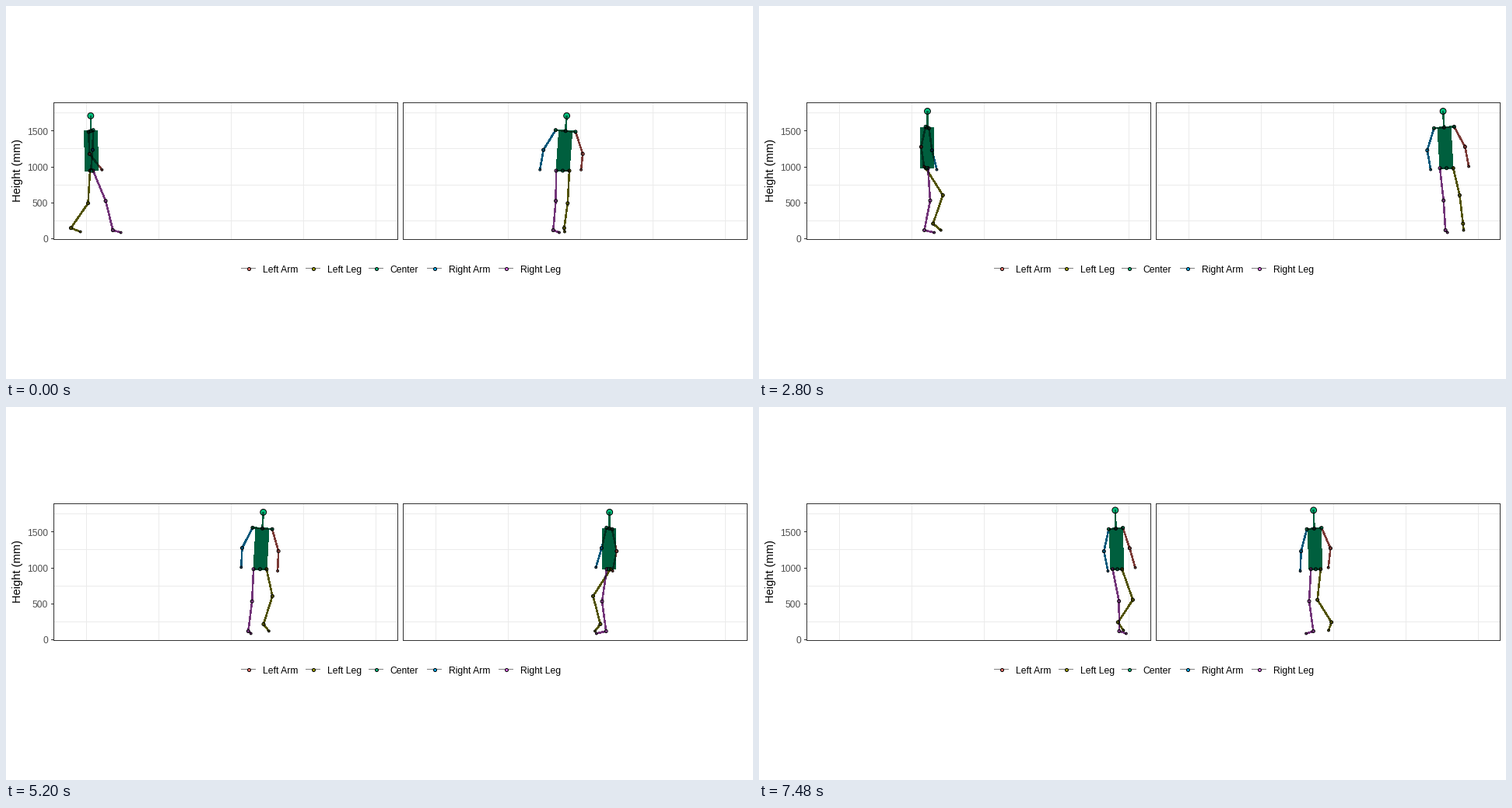
Recreate the animation shown at these times as a matplotlib script. Size 960 by 480 pixels, loop 7.5 s.

```python
import numpy as np
import matplotlib.pyplot as plt
from matplotlib.animation import FuncAnimation
from matplotlib.collections import LineCollection
from matplotlib.patches import Rectangle

W, H, DPI = 960, 480, 100
FRAMES, STEP = 375, 20
PX = 72 / DPI

RED, OLIVE, GREEN, BLUE, PINK = "#F8766D", "#A3A500", "#00BF7D", "#00B0F6", "#E76BF3"
THIGH, SHANK, UPPER, FORE, FOOT = 42, 39, 30, 26, 13.2
HIP, SHOULDER = 8.7, 13.1
SWING, MID_STANCE = 0.45, 0.83

# key points of the walk: time, x, y, heading in degrees
WALK = np.array([
    (-0.5, 72, 712, 0), (0, 109.5, 715, 13), (0.76, 146, 733, 86),
    (1.92, 164, 832, 48), (3, 230, 888, 0), (3.72, 291, 880, -35),
    (4.4, 317, 836, -66), (5.2, 326, 774, -74), (5.86, 353, 730, -20),
    (6.7, 405, 729, 0), (7.48, 460, 715, -44), (8.1, 496, 697, -55),
])
TIMES, KEYS = WALK[:, 0], WALK[:, 1:]
SLOPES = np.gradient(KEYS, TIMES, axis=0)


def smooth(p):
    p = np.clip(p, 0, 1)
    return p * p * (3 - 2 * p)


def hermite(a, b, va, vb, s):
    e = s * s * (3 - 2 * s)
    return a + e * (b - a) + s * (1 - s) ** 2 * va - s * s * (1 - s) * vb


def walk(t):
    """Pelvis x, y and heading."""
    t = np.clip(t, TIMES[0], TIMES[-1])
    i = min(np.searchsorted(TIMES, t, "right") - 1, len(TIMES) - 2)
    d = TIMES[i + 1] - TIMES[i]
    return hermite(KEYS[i], KEYS[i + 1], d * SLOPES[i], d * SLOPES[i + 1],
                   (t - TIMES[i]) / d)


def lean(t):
    """Sideways lean into the turn, positive to the left."""
    rate = (walk(t + 0.15)[2] - walk(t - 0.15)[2]) / 0.3
    return 5 * np.tanh(rate / 60)


def axes_of(deg):
    """Forward and left unit vectors of a heading."""
    c, s = np.cos(np.radians(deg)), np.sin(np.radians(deg))
    return np.array([c, s, 0]), np.array([-s, c, 0])


def lift(i):
    """Lift-off time of step i; even steps are left."""
    return 0.06 + 0.603 * i + 0.08 * np.sin(np.pi * i / 12)


STEPS = np.arange(-2, 15)


def footprint(i):
    """Ground spot and heading of step i; feet stay outside the turn."""
    t = lift(i) + MID_STANCE
    x, y, ang = walk(t)
    side = 8 if i % 2 == 0 else -8
    return np.array([x, y, 288]) + axes_of(ang)[1] * (side - 2.5 * lean(t)), ang


def foot(i, t):
    """Ankle, toe and foot heading; i is the first step of that foot."""
    while lift(i + 2) < t + 0.16:
        i += 2
    (a, ang_a), (b, ang_b) = footprint(i - 2), footprint(i)
    p = (t - lift(i)) / SWING
    s = smooth(p)
    pull = 1.3 * np.linalg.norm(b - a)
    ang = ang_a + s * (ang_b - ang_a)
    ankle = hermite(a, b, pull * axes_of(ang_a)[0], pull * axes_of(ang_b)[0], s)
    rise = 12 * np.sin(np.pi * (np.clip(p, -0.35, 1) + 0.35) / 1.35) ** 2
    drop = 3 + 0.65 * rise
    ankle[2] -= rise
    toe = ankle + axes_of(ang)[0] * np.sqrt(FOOT ** 2 - drop ** 2)
    toe[2] += drop
    return ankle, toe, ang


def leg(hip, heading, first, t):
    ankle, toe, ang = foot(first, t)
    v = ankle - hip
    full = np.linalg.norm(v)
    d = min(full, THIGH + SHANK - 0.1)
    v /= full
    along = (THIGH ** 2 - SHANK ** 2 + d * d) / (2 * d)
    ahead = axes_of((heading + ang) / 2)[0]
    ahead -= ahead.dot(v) * v
    ahead /= np.linalg.norm(ahead)
    knee = hip + v * along * full / d + ahead * np.sqrt(max(THIGH ** 2 - along ** 2, 0))
    return [hip, knee, ankle, toe]


def bone(start, fwd, left, f, l, length):
    end = start + f * fwd + l * left
    end[2] += np.sqrt(length ** 2 - f * f - l * l)
    return end


def pose(t):
    x, y, heading = walk(t)
    fwd, left = axes_of(heading)
    tilt = lean(t)
    sway = -0.85 * tilt
    beat = np.interp(t, lift(STEPS), STEPS)
    bob = np.cos(2 * np.pi * (beat - 0.38))
    swing = np.cos(np.pi * (beat + 0.2))

    ground = np.array([x, y, 0])
    hip = ground + [0, 0, 209.8 - 1.7 * bob]
    chest = ground + tilt * left + [0, 0, 158 - 2.3 * bob]
    head = ground + 1.4 * tilt * left
    head[2] = 137.8 - 3 * bob - 2.7 * smooth(t - 6.4)

    span = left * SHOULDER - np.array([0, 0, 0.35 * sway])
    sh_l, sh_r = chest + span, chest - span
    el_l = bone(sh_l, fwd, left, -1.5 + 5 * swing, 12 + sway, UPPER)
    el_r = bone(sh_r, fwd, left, 0.5 - 5 * swing, -12 + sway, UPPER)
    wr_l = bone(el_l, fwd, left, 7.5 + 8 * swing, 1.2 * sway - 2 * swing, FORE)
    wr_r = bone(el_r, fwd, left, 4 - 7.5 * swing, 1.2 * sway, FORE)
    leg_l = leg(hip + HIP * left, heading, -2, t)
    leg_r = leg(hip - HIP * left, heading, -1, t)

    lines = [[sh_l, el_l, wr_l], leg_l, [sh_r, el_r, wr_r], leg_r,
             [head, chest], [sh_l, chest, sh_r], [leg_l[0], hip, leg_r[0]], [chest, hip]]
    dots = [el_l, wr_l, *leg_l, el_r, wr_r, *leg_r, hip, sh_l, chest, sh_r, head]
    return lines, dots


LINE_COLORS = [RED, OLIVE, BLUE, PINK] + [GREEN] * 4
LINE_WIDTHS = [1.5 * PX] * 7 + [17 * PX]
DOT_COLORS = [RED] * 2 + [OLIVE] * 4 + [BLUE] * 2 + [PINK] * 4 + [GREEN] * 5
BIG, SMALL, SKULL = [((d * PX) ** 2) for d in (4, 2.8, 7.8)]
DOT_SIZES = ([BIG, SMALL] + [BIG] * 3 + [SMALL]) * 2 + [BIG] * 4 + [SKULL]

plt.rcParams["font.family"] = "Liberation Sans"
fig = plt.figure(figsize=(W / DPI, H / DPI), dpi=DPI, facecolor="white")
ax = fig.add_axes([0, 0, 1, 1])
ax.axis("off")

SNAP = 0.25  # keeps one-pixel rules on their own pixel when snapped


def rule(x0, y0, x1, y1, color):
    ax.plot([x0 + SNAP, x1 + SNAP], [y0 + SNAP, y1 + SNAP], color=color, lw=PX,
            zorder=0, snap=True, antialiased=False, solid_capstyle="butt")


def label(x, y, s, px, color, **kw):
    ax.text(x, y, s, fontsize=px * PX, color=color, **kw)


for x0 in (61, 510):
    for k in range(5):
        gx = x0 + 42 + 93 * k
        rule(gx, 124, gx, 300, "#EBEBEB")
    for k in range(4):
        gy = round(137 + 46.4 * k)
        rule(x0, gy, x0 + 442, gy, "#EBEBEB")
    ax.add_patch(Rectangle((x0 + SNAP, 124 + SNAP), 442, 176, fill=False, ec="#333333",
                           lw=PX, antialiased=False, snap=True, zorder=8))

for k in range(4):
    ty = round(299.4 - 46.4 * k)
    rule(58, ty, 61, ty, "#333333")
    label(54, ty + 5.5, str(500 * k), 12, "#4D4D4D", ha="right", va="baseline")
label(15, 211, "Height (mm)", 14.67, "black", rotation=90, ha="center", va="center")

for kx, name, color in ((311, "Left Arm", RED), (394, "Left Leg", OLIVE),
                        (475, "Center", GREEN), (550, "Right Arm", BLUE),
                        (642, "Right Leg", PINK)):
    rule(kx - 9, 337, kx + 9, 337, "#7F7F7F")
    ax.scatter(kx + .5, 337.5, s=BIG, c=color, edgecolors="black",
               linewidths=PX, zorder=2)
    label(kx + 18.7, 343, name, 12.1, "black", va="baseline")

stroke = dict(linewidths=LINE_WIDTHS * 2, antialiaseds=False, capstyle="butt")
flesh = LineCollection([], colors=LINE_COLORS * 2, zorder=3, **stroke)
shade = LineCollection([], colors=[(0, 0, 0, 0.5)], zorder=5, **stroke)
ax.add_collection(flesh, autolim=False)
ax.add_collection(shade, autolim=False)
blank = np.zeros(2 * len(DOT_COLORS))
joints = ax.scatter(blank, blank, s=DOT_SIZES * 2, c=DOT_COLORS * 2,
                    edgecolors="black", linewidths=PX, zorder=4)
ax.set_xlim(0, W)
ax.set_ylim(H, 0)


def update(i):
    lines, dots = pose(i * STEP / 1000)
    views = ([0, 2], [1, 2])
    segs = [np.array(part)[:, v] + .5 for v in views for part in lines]
    flesh.set_segments(segs)
    shade.set_segments(segs)
    joints.set_offsets(np.vstack([np.array(dots)[:, v] + .5 for v in views]))
    return flesh, joints, shade


anim = FuncAnimation(fig, update, frames=FRAMES, interval=STEP, repeat=True,
                     repeat_delay=0, blit=False)
plt.show()
```
